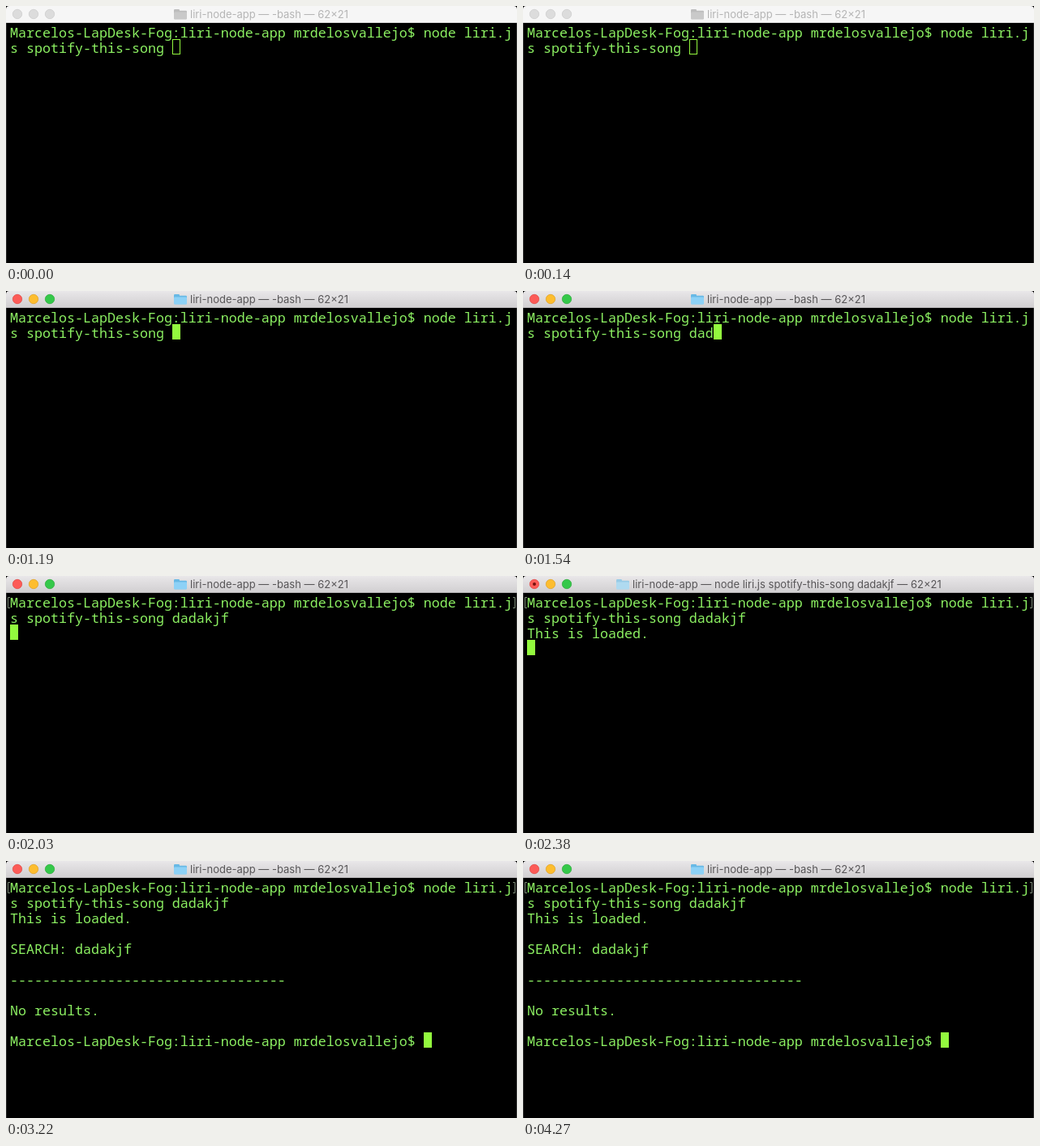
Recreate the animation shown at these times as an HTML page with a canvas. Size 630 by 318 pixels, loop 4.62 s.

```html
<!DOCTYPE html>
<html lang="en">
<head>
<meta charset="utf-8">
<title>Terminal session</title>
<style>
  html, body { margin: 0; width: 100%; height: 100%; overflow: hidden; background: #000; }
  canvas { display: block; }
</style>
</head>
<body>
<canvas id="stage" width="630" height="318"></canvas>
<script>
const ctx = document.getElementById('stage').getContext('2d');
const W = 630, H = 318, LOOP = 4620;
const COL = 10, ROW = 19, LEFT = 5, TOP = 22;
const TEXT = '#8cf062', CURSOR = '#93f93e';

const PROMPT = 'Marcelos-LapDesk-Fog:liri-node-app mrdelosvallejo$ ';
const COMMAND = 's spotify-this-song ';
const QUERY = 'dadakjf';
const RESULTS = ['', 'SEARCH: ' + QUERY, '', '-'.repeat(34), '', 'No results.', '', PROMPT];

// [start time, number of query letters typed]
const TYPING = [[0, 0], [1260, 1], [1400, 2], [1540, 3], [1610, 5], [1680, 7]];

const within = (t, from, to) => t >= from && t < to;

function stateAt(t) {
  const typed = TYPING.filter(([start]) => t >= start).pop()[1];
  const lines = [PROMPT + 'node liri.j', COMMAND + QUERY.slice(0, typed)];
  const entered = t >= 2030;
  if (t >= 2380) lines.push('This is loaded.');
  if (t >= 2660) lines.push(...RESULTS);
  else if (entered) lines.push('');
  return {
    lines,
    entered,
    active: t >= 560,
    running: within(t, 2100, 2730),
    busyDot: within(t, 2100, 3220),
    cursorOn: !within(t, 560, 1050) && !within(t, 3710, 4270)
  };
}

function rect(x, y, w, h, fill) {
  ctx.fillStyle = fill;
  ctx.fillRect(x, y, w, h);
}

function disc(x, y, r, fill, edge) {
  ctx.beginPath();
  ctx.arc(x, y, r, 0, Math.PI * 2);
  ctx.fillStyle = fill;
  ctx.fill();
  if (edge) {
    ctx.strokeStyle = edge;
    ctx.lineWidth = 0.7;
    ctx.stroke();
  }
}

function folder(x, y, back, front) {
  ctx.fillStyle = back;
  ctx.beginPath();
  ctx.roundRect(x, y, 7, 5, 1.2);
  ctx.roundRect(x, y + 1.7, 16, 10.5, 1.2);
  ctx.fill();
  ctx.fillStyle = front;
  ctx.beginPath();
  ctx.roundRect(x, y + 3.5, 16, 9, 1.2);
  ctx.fill();
}

function titleBar({ active, running, busyDot }) {
  const shade = ctx.createLinearGradient(0, 0, 0, 21);
  shade.addColorStop(0, active ? '#e9e7e9' : '#f6f6f6');
  shade.addColorStop(1, active ? '#d0ced0' : '#f6f6f6');
  ctx.fillStyle = shade;
  ctx.beginPath();
  ctx.roundRect(0, 0, W, 21, [4, 4, 0, 0]);
  ctx.fill();
  rect(0, 20, W, 1, active ? '#b4b2b4' : '#dadada');

  const lights = active
    ? [['#fc5b57', '#e0443f'], ['#fdbd2f', '#dfa023'], ['#35c84a', '#27aa35']]
    : Array(3).fill(['#dcdcdc', '#cbcbcb']);
  lights.forEach(([fill, edge], i) => disc(14 + 20 * i, 10, 5.7, fill, edge));
  if (busyDot) disc(14, 10, 2, '#75110e');

  const x = running ? 115 : 207;
  if (!active) folder(x, 4, '#bdbdbd', '#c9c9c9');
  else if (running) folder(x, 4, '#98cbe6', '#afdaf0');
  else folder(x, 4, '#68b9e5', '#8dd1f6');

  const job = running ? 'node liri.js ' + COMMAND.slice(2) + QUERY : '-bash';
  ctx.font = '13px Inter, sans-serif';
  ctx.fillStyle = active ? '#575557' : '#b5b5b5';
  ctx.fillText(`liri-node-app — ${job} — 62×21`, x + 20, 15);
}

function lineMarks() {
  ctx.strokeStyle = '#7d8a78';
  ctx.lineWidth = 1;
  for (const [outer, inner] of [[2.5, 5], [627.5, 625]]) {
    ctx.beginPath();
    ctx.moveTo(inner, 26.5);
    ctx.lineTo(outer, 26.5);
    ctx.lineTo(outer, 39.5);
    ctx.lineTo(inner, 39.5);
    ctx.stroke();
  }
}

function cursor(col, row, solid) {
  const x = LEFT + col * COL, y = TOP + row * ROW;
  if (solid) {
    rect(x, y, COL, ROW, CURSOR);
  } else {
    ctx.strokeStyle = CURSOR;
    ctx.lineWidth = 1;
    ctx.strokeRect(x + 0.5, y + 0.5, COL - 1, ROW - 1);
  }
}

function draw(t) {
  const s = stateAt(t);
  rect(0, 0, W, H, '#000');
  rect(0, 21, 1, H - 21, '#2c2c2c');
  rect(W - 1, 21, 1, H - 21, '#2c2c2c');
  titleBar(s);
  if (s.entered) lineMarks();

  ctx.font = '300 16.667px "Noto Sans Mono", "DejaVu Sans Mono", monospace';
  ctx.fillStyle = TEXT;
  s.lines.forEach((line, i) => ctx.fillText(line, LEFT, TOP + 17 + i * ROW));

  const row = s.lines.length - 1;
  if (s.cursorOn) cursor(s.lines[row].length, row, s.active);
}

const start = performance.now();
function tick() {
  draw((performance.now() - start) % LOOP);
  requestAnimationFrame(tick);
}
tick();
</script>
</body>
</html>
```
